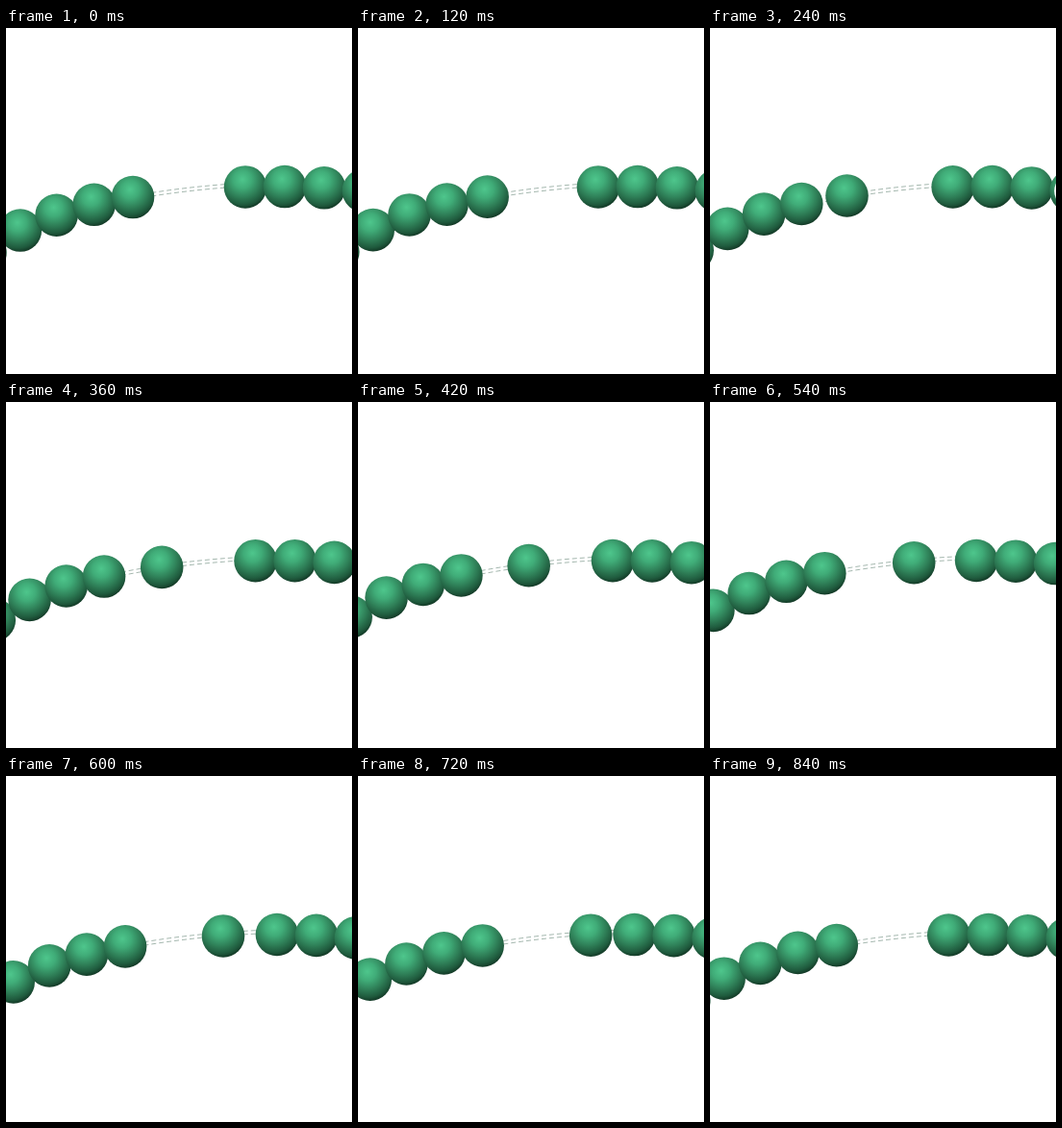
An HTML page with a canvas for the animation above (870 ms loop, 360 by 360 pixels).

```html
<!DOCTYPE html>
<html lang="en">
<head>
<meta charset="utf-8">
<title>Beads on a thread</title>
<style>
  html, body { margin: 0; height: 100%; overflow: hidden; background: #fff; }
  canvas { display: block; }
</style>
</head>
<body>
<canvas id="stage" width="360" height="360"></canvas>
<script>
const ctx = document.getElementById('stage').getContext('2d');
const LOOP = 870, STEP = 30, RADIUS = 22.3;
const FIRST = -5, LAST = 4;

// Resting place k: a row on the left (k <= 0) and, past the gap, one on the right.
const restX = k => k > 0 ? 249 + 41 * (k - 1) : 132 + 41 * k + 0.65 * k * k;

// The string is nearly flat around x = 280 and falls away ever faster to the left.
function trackY(x) {
  const d = 280 - x;
  return 165 + 4.9e-4 * d ** 2 + 3.2e-14 * d ** 6;
}

const logistic = u => 1 / (1 + Math.exp(-8.6 * (u - 0.535)));
const ease = u => (logistic(u) - logistic(0)) / (logistic(1) - logistic(0));

function disc(x, y, r, fill) {
  ctx.fillStyle = fill;
  ctx.beginPath();
  ctx.arc(x, y, r, 0, 2 * Math.PI);
  ctx.fill();
}

function bead(x, y) {
  const shade = ctx.createRadialGradient(x - 3, y - 8, 0, x - 3, y - 8, 31);
  shade.addColorStop(0, '#4ec68c');
  shade.addColorStop(0.3, '#40ac78');
  shade.addColorStop(0.6, '#2f8058');
  shade.addColorStop(0.85, '#1f5a3d');
  shade.addColorStop(1, '#123624');
  disc(x, y, RADIUS, shade);
}

function strand(dy) {
  ctx.beginPath();
  for (let x = 112; x <= 272; x += 4) {
    ctx.lineTo(x, trackY(x) - 1.4 - 0.025 * (x - 136) + dy);
  }
  ctx.stroke();
}

function draw(ms) {
  const p = ease(Math.floor(ms % LOOP / STEP) * STEP / LOOP);

  ctx.fillStyle = '#fff';
  ctx.fillRect(0, 0, 360, 360);

  ctx.strokeStyle = '#7d988c';
  ctx.lineWidth = 0.7;
  ctx.setLineDash([5, 3]);
  strand(0);
  strand(3.5);

  for (let k = FIRST; k <= LAST; k++) {
    const x = restX(k) + (restX(k + 1) - restX(k)) * p;
    bead(x, trackY(x));
    // The last bead turns hollow as it leaves.
    if (k === LAST && p > 0.05) disc(x + 1, trackY(x), 18.5, '#fff');
  }
}

function tick() {
  draw(performance.now());
  requestAnimationFrame(tick);
}
tick();
</script>
</body>
</html>
```
